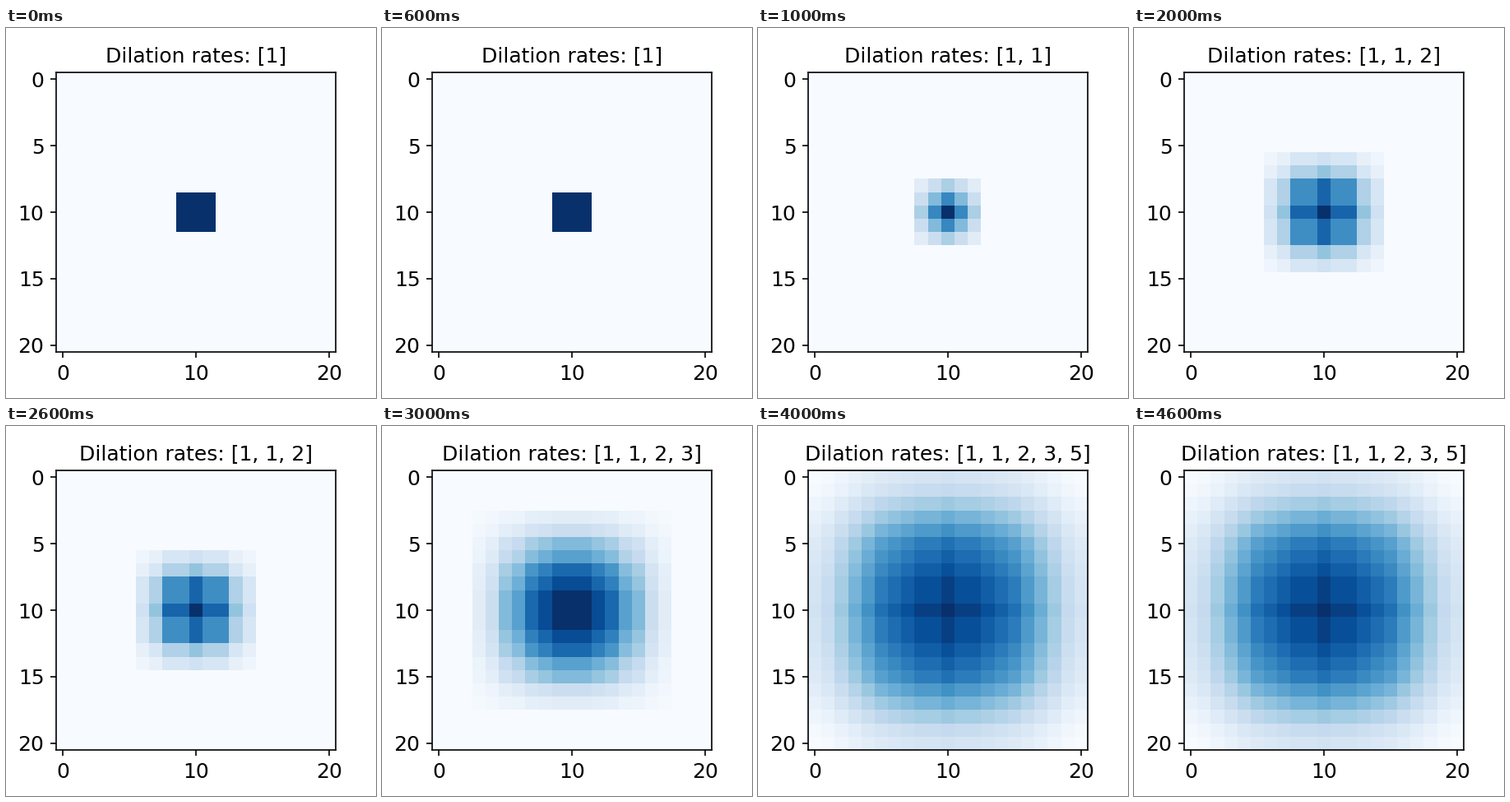
Recreate the animation shown at these times as a matplotlib script. Size 450 by 450 pixels, loop 5000 ms.

```python
import numpy as np
import matplotlib.pyplot as plt
from matplotlib.animation import FuncAnimation

SIZE, DPI = 450, 150
GRID = 21
RATES = [1, 1, 2, 3, 5]


def receptive_field(rates):
    """Stack 3x3 dilated kernels of ones on a single centre cell."""
    line = np.ones(1)
    for rate in rates:
        kernel = np.zeros(2 * rate + 1)
        kernel[::rate] = 1
        line = np.convolve(line, kernel)
    line = np.pad(line, GRID)
    start = (len(line) - GRID) // 2
    line = line[start:start + GRID]
    return np.outer(line, line)


plt.rcParams["font.family"] = "DejaVu Sans"
fig = plt.figure(figsize=(SIZE / DPI, SIZE / DPI), dpi=DPI)
left, top, side = 61, 54, 340
ax = fig.add_axes([left / SIZE, 1 - (top + side) / SIZE, side / SIZE, side / SIZE])
image = ax.imshow(np.zeros((GRID, GRID)), cmap="Blues", interpolation="nearest")
title = ax.set_title("", fontsize=12)
ax.set_xticks([0, 10, 20])
ax.set_yticks([0, 5, 10, 15, 20])
ax.tick_params(labelsize=12)


def update(i):
    rates = RATES[:i + 1]
    field = receptive_field(rates)
    image.set_data(field)
    image.set_clim(field.min(), field.max())
    title.set_text(f"Dilation rates: {rates}")
    return image, title


anim = FuncAnimation(fig, update, frames=len(RATES), interval=1000,
                     repeat=True, repeat_delay=0)
plt.show()
```
